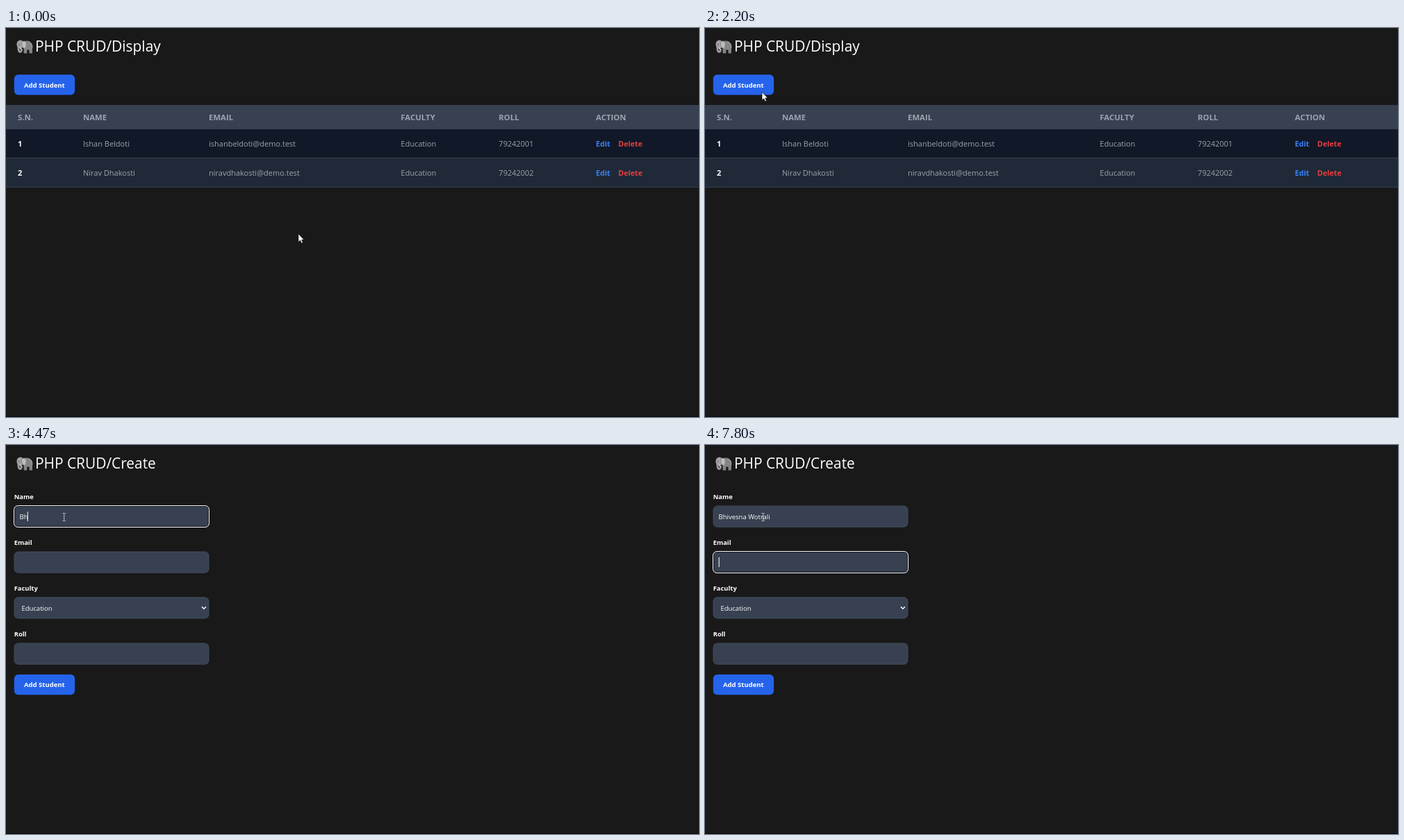
Animation, 998 px wide and 561 px high, one loop 8 s. Source, as an HTML page:

```html
<!DOCTYPE html>
<html lang="en">
<head>
<meta charset="utf-8">
<title>PHP CRUD</title>
<style>
  html, body { margin: 0; width: 100%; height: 100%; overflow: hidden; background: #19191a; }
  svg { display: block; width: 100vw; height: 100vh; }
  text { font-family: "Open Sans", "Noto Sans", sans-serif; white-space: pre; }
  .title { font-size: 20.9px; fill: #fff; }
  .head { font-size: 11.4px; font-weight: 650; fill: #9ca3af; }
  .cell { font-size: 11px; fill: #9ca3af; }
  .num { font-size: 11px; font-weight: 700; fill: #fff; }
  .edit, .del { font-size: 10.7px; font-weight: 650; fill: #3b82f6; }
  .del { fill: #e53e3e; }
  .label, .btn { font-size: 9.4px; font-weight: 700; fill: #fff; }
  .btn { font-size: 9.5px; }
  .value { font-size: 9.5px; font-weight: 500; fill: #fff; }
  .field { fill: #374151; stroke: #4b5563; stroke-width: .8; }
</style>
</head>
<body>
<svg id="stage" viewBox="0 0 998 561">
  <rect width="998" height="561" fill="#19191a"/>
  <rect y="560" width="998" height="1" fill="#080808"/>
  <g id="elephant">
    <path d="M24 20Q34 16 37.3 23.5Q38.3 26 37.8 36.5H33.5V31.5H30.3V36.5H25.6V29Z" fill="#858585"/>
    <path d="M33 20.5Q38.3 22 37.6 29" fill="none" stroke="#a5a5a5" stroke-width="1.2"/>
    <path d="M18 25Q17.5 33 19.5 34.2Q22 35 22.4 31.5" fill="none" stroke="#9b9b9b" stroke-width="3"/>
    <ellipse cx="20.8" cy="23.6" rx="5.4" ry="6" fill="#a3a3a3"/>
    <path d="M22.5 20Q28 17 29.3 22Q30 27 26.5 30Q23.5 28 22.5 25Z" fill="#bcbcbc" stroke="#747474" stroke-width=".7"/>
    <path d="M20.5 28.5Q20.8 31 23.6 30.8" fill="none" stroke="#eee" stroke-width="1.3"/>
    <circle cx="18.8" cy="24" r=".8" fill="#333"/>
  </g>
  <text id="title" class="title" x="41.9" y="34"></text>
  <g id="list"></g>
  <g id="form"></g>
  <g id="ring" fill="none">
    <rect x="12.5" y=".5" width="279" height="29" rx="4.8" stroke="#111318"/>
    <rect x="11.5" y="-.5" width="281" height="31" rx="5.8" stroke="#fff"/>
  </g>
  <path id="squiggle" fill="none" stroke="#e5484d" stroke-width=".9"/>
  <text id="typed" class="value" x="19.6" y="106.7"></text>
  <rect id="caret" width="1" height="14" fill="#fff"/>
  <path id="arrow" d="M0 0V12L2.7 9.5L4.6 13.7L6.6 12.8L4.8 8.7H8.4Z" fill="#fff" stroke="#000" stroke-width=".7"/>
  <path id="beam" d="M-2.2 -5.5H-.6L0 -5L.6 -5.5H2.2M0 -5V5M-2.2 5.5H-.6L0 5L.6 5.5H2.2" fill="none" stroke="#c9cdd3" stroke-width=".9"/>
</svg>
<script>
  const LOOP = 8000, OPEN = 2330, FOCUS = 3000, SPACE = 5870, TAB = 7800, BLINK = 530;
  const NAME = "Bhivesna Wotrali";
  const KEYS = [3930, 4470, 4600, 4800, 5330, 5400, 5600, 5670, SPACE,
    6130, 6400, 6600, 6730, 6930, 7000, 7130];
  // time, x, y
  const ARROW = [[0, 421, 296.8], [930, 419, 300], [1000, 405, 310], [1070, 365, 314],
    [1130, 290, 296], [1200, 215, 255], [1270, 145, 205], [1330, 97, 165.3], [1400, 84, 135],
    [1470, 81.5, 115], [1530, 81.5, 103], [1600, 82, 96], [1670, 82, 92.3]];
  const BEAM = [[0, 83.7, 93], [2670, 83.7, 96], [2730, 83.7, 100], [2800, 83.7, 104]];

  const $ = id => document.getElementById(id);
  const text = (cls, x, y, s) => `<text class="${cls}" x="${x}" y="${y}">${s}</text>`;
  const rect = (x, y, w, h, fill) => `<rect x="${x}" y="${y}" width="${w}" height="${h}" fill="${fill}"/>`;
  const button = y => `<rect x="11.8" y="${y}" width="87.3" height="29.2" rx="5.8" fill="#2563eb"/>`
    + text("btn", 26, y + 18.3, "Add Student");

  const COLS = [17, 111, 292, 568.6, 709.6, 849.5];
  const row = (y, fill, cells) => rect(0, y, 998, 41, fill) + rect(0, y + 41, 998, 1, "#374151")
    + cells.map((s, i) => text(i ? "cell" : "num", COLS[i], y + 25, s)).join("")
    + text("edit", COLS[5], y + 25, "Edit") + text("del", 881.8, y + 25, "Delete");

  $("list").innerHTML = button(67.2) + rect(0, 111, 998, 35, "#374151")
    + ["S.N.", "NAME", "EMAIL", "FACULTY", "ROLL", "ACTION"]
      .map((s, i) => text("head", COLS[i], 132.9, s)).join("")
    + row(146, "#111827", ["1", "Ishan Beldoti", "ishanbeldoti@demo.test", "Education", "79242001"])
    + row(188, "#1f2937", ["2", "Nirav Dhakosti", "niravdhakosti@demo.test", "Education", "79242002"]);

  const FIELDS = [["Name", 88], ["Email", 154], ["Faculty", 219.8], ["Roll", 286]];
  $("form").innerHTML = FIELDS.map(([s, y]) => text("label", 11.7, y - 9.8, s)
      + `<rect class="field" x="12" y="${y}" width="280" height="30.2" rx="5.6"/>`).join("")
    + text("value", 22.4, 239, "Education")
    + '<path d="M282 233.2L285 236.2L288 233.2" fill="none" stroke="#fff" stroke-width="1.5"/>'
    + button(331);

  let wave = "M20 110";
  for (let x = 21.5, up = true; x < 59; x += 1.5, up = !up) wave += `L${x} ${up ? 108.8 : 110.4}`;
  $("squiggle").setAttribute("d", wave);

  const show = (id, on) => $(id).style.display = on ? "" : "none";
  const place = (id, x, y) => $(id).setAttribute("transform", `translate(${x} ${y})`);
  const put = (id, s) => { if ($(id).textContent !== s) $(id).textContent = s; };
  const at = (track, t) => track.filter(p => p[0] <= t).pop().slice(1);

  function draw(t) {
    const form = t >= OPEN, focus = t >= FOCUS, email = t >= TAB;
    put("title", "PHP CRUD/" + (form ? "Create" : "Display"));
    show("list", !form);
    show("form", form);
    show("arrow", !form);
    show("beam", form);
    place("arrow", ...at(ARROW, t));
    place("beam", ...at(BEAM, t));

    const pressed = KEYS.filter(k => k <= t);
    put("typed", NAME.slice(0, pressed.length));
    show("squiggle", t >= SPACE && !email);
    show("ring", focus);
    place("ring", 0, FIELDS[email ? 1 : 0][1]);

    const last = email ? TAB : pressed[pressed.length - 1] || FOCUS;
    show("caret", focus && (t - last) % (2 * BLINK) < BLINK);
    const width = pressed.length && !email ? $("typed").getComputedTextLength() : 0;
    place("caret", Math.max(20, Math.round(19.2 + width)) - .3, email ? 162 : 96);
  }

  const start = performance.now();
  function tick() {
    draw((performance.now() - start) % LOOP);
    requestAnimationFrame(tick);
  }
  tick();
</script>
</body>
</html>
```
